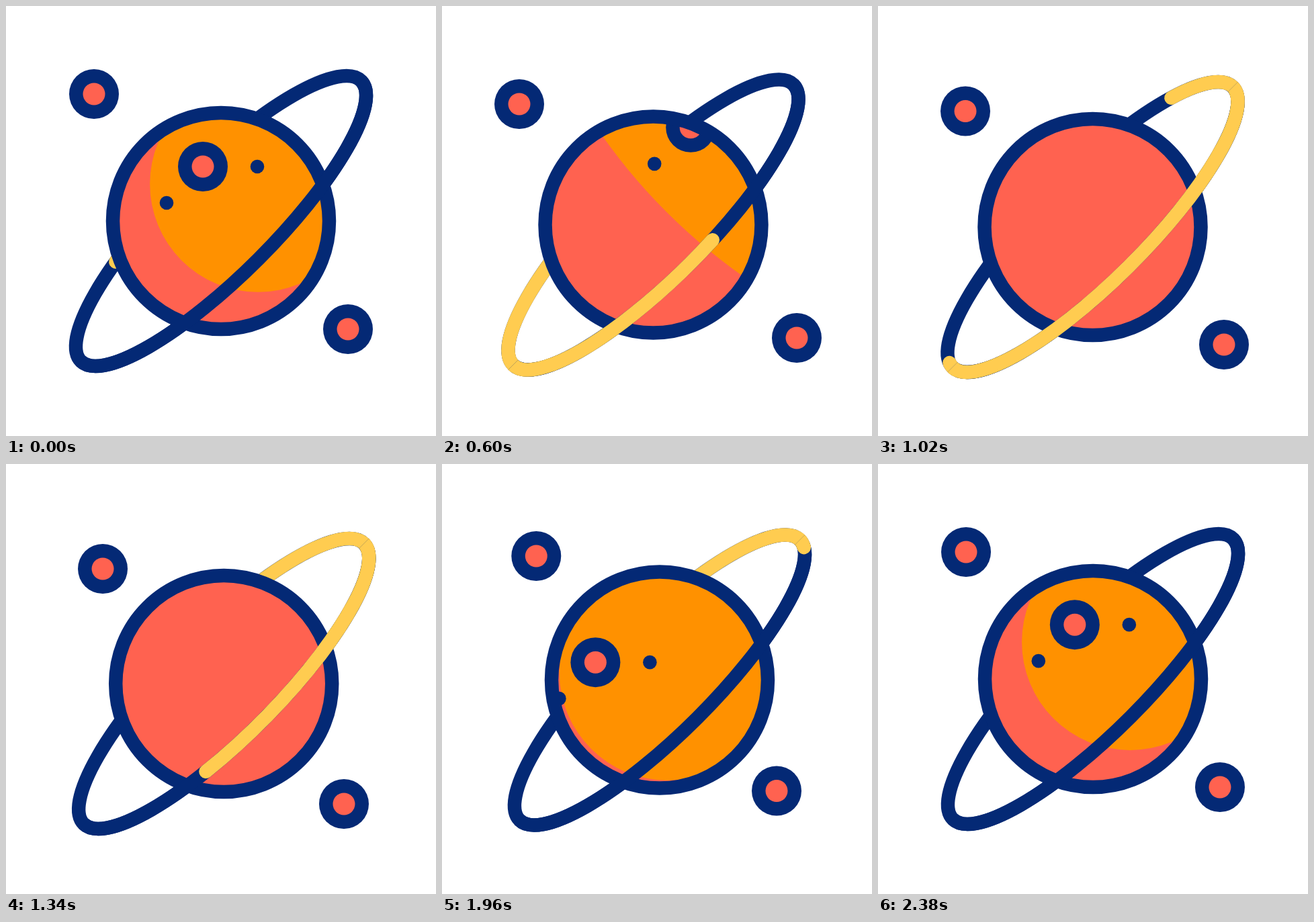
Write an HTML page with a canvas that moves like this. It is 640x640 px and loops after 2400 ms.

```html
<!DOCTYPE html>
<html>
<head>
<meta charset="utf-8">
<style>
  html, body { margin: 0; height: 100%; overflow: hidden; background: #fff; }
  canvas { display: block; }
</style>
</head>
<body>
<canvas id="stage" width="640" height="640"></canvas>
<script>
const ctx = document.getElementById('stage').getContext('2d');
const LOOP = 2400, LINE = 20.5, TAU = Math.PI * 2;
const NAVY = '#042975', RED = '#ff6250', ORANGE = '#ff9100', YELLOW = '#ffcc50';

// Floating paths: offsets from the resting place at shared key times
const TIMES = [0, 220, 600, 1020, 1340, 1740, 1960, LOOP];
const PLANET_PATH = [[0, 0], [-2, -.7], [-5.5, 5.5], [-.5, 9], [4.2, 7], [5.2, 3.2], [4, 1.5], [0, 0]];
const LEFT_PATH = [[0, 0], [-6, -2], [-16, 15], [-1, 25.5], [13, 25], [13.5, 11], [9.3, 6], [0, 0]];
const RIGHT_PATH = [[0, 0], [7, -1.5], [19, 13], [6, 23], [-6, 25], [-13.5, 13], [-11, 5.5], [0, 0]];

const smooth = x => x * x * (3 - 2 * x);

function slope(path, i, axis) {
  if (i === 0 || i === path.length - 1) return 0;
  return (path[i + 1][axis] - path[i - 1][axis]) / (TIMES[i + 1] - TIMES[i - 1]);
}

function follow(path, t) {
  let i = 0;
  while (t >= TIMES[i + 1]) i++;
  const span = TIMES[i + 1] - TIMES[i], s = (t - TIMES[i]) / span, e = smooth(s);
  return [0, 1].map(axis =>
    path[i][axis] * (1 - e) + path[i + 1][axis] * e +
    span * s * (1 - s) * ((1 - s) * slope(path, i, axis) - s * slope(path, i + 1, axis)));
}

function disc(x, y, r, color) {
  ctx.beginPath();
  ctx.arc(x, y, r, 0, TAU);
  ctx.fillStyle = color;
  ctx.fill();
}

function moon(x, y) {
  disc(x, y, 37, NAVY);
  disc(x, y, 16.5, RED);
}

function ellipse(from, to, color) {
  ctx.beginPath();
  ctx.ellipse(0, 0, 295, 79.5, 0, from, to, true);
  ctx.strokeStyle = color;
  ctx.stroke();
}

function ring(t, frontOnly) {
  const length = 1008;
  const head = Math.min(length, 20 + .883 * t);
  const tail = Math.max(0, .673 * (t - 757));
  ctx.save();
  ctx.rotate(-Math.PI / 4);
  if (frontOnly) {
    ctx.beginPath();
    ctx.rect(-320, 0, 640, 120);
    ctx.clip();
  }
  ctx.lineWidth = LINE;
  ellipse(TAU, 0, NAVY);
  if (head > tail) {
    ctx.lineCap = 'round';
    ctx.setLineDash([head - tail, 3000]);
    ctx.lineDashOffset = -tail;
    ellipse(4.245, -1.103, YELLOW);
  }
  ctx.restore();
}

// Light and shade slide along the ring's long axis
function surface(leaving, e) {
  ctx.save();
  ctx.rotate(-Math.PI / 4);
  disc(0, 0, 165, RED);
  const radius = leaving ? 161 + 1422 * e : 161;
  const edge = leaving ? -83 + 170 * e + 100 * e * e : -83 - 203 * (1 - e);
  disc(edge + radius, 0, radius, ORANGE);
  if (!leaving) {
    const shade = -380 + 770 * e;
    if (shade < 165) disc(shade + 357, 0, 357, RED);
  }
  ctx.restore();
}

function planet(t) {
  const half = LOOP / 2, leaving = t < half, e = smooth(t % half / half);
  const dx = leaving ? 165 * e : -226 * (1 - e);
  const dy = leaving ? -127 * e : 180 * (1 - e);
  ctx.save();
  ctx.beginPath();
  ctx.arc(0, 0, 161, 0, TAU);
  ctx.clip();
  surface(leaving, e);
  moon(dx - 27, dy - 81);
  disc(dx + 54, dy - 81, 10.3, NAVY);
  disc(dx - 81, dy - 27, 10.3, NAVY);
  ctx.restore();
  ctx.beginPath();
  ctx.arc(0, 0, 161, 0, TAU);
  ctx.lineWidth = LINE;
  ctx.strokeStyle = NAVY;
  ctx.stroke();
}

function draw() {
  const t = performance.now() % LOOP;
  ctx.fillStyle = '#fff';
  ctx.fillRect(0, 0, 640, 640);

  const [lx, ly] = follow(LEFT_PATH, t), [rx, ry] = follow(RIGHT_PATH, t);
  moon(131 + lx, 131 + ly);
  moon(509 + rx, 481 + ry);

  const [px, py] = follow(PLANET_PATH, t);
  ctx.save();
  ctx.translate(320 + px, 320 + py);
  ring(t, false);
  planet(t);
  ring(t, true);
  ctx.restore();
  requestAnimationFrame(draw);
}
draw();
</script>
</body>
</html>
```
